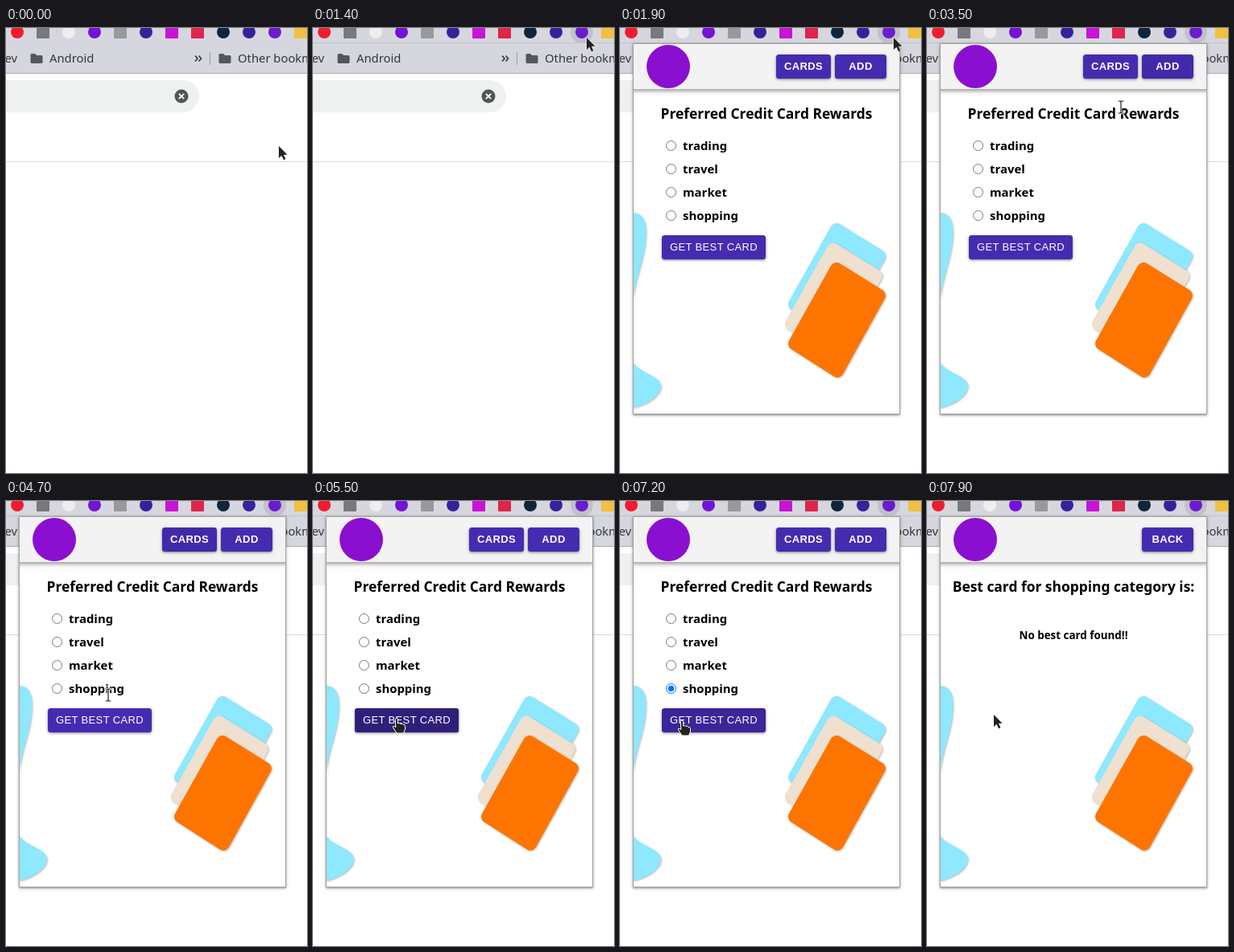
Recreate the animation shown at these times as an HTML page. Size 374x554 px, loop 8000 ms.

```html
<!DOCTYPE html>
<html lang="en">
<head>
<meta charset="utf-8">
<title>Card rewards popup</title>
<style>
  html, body { margin: 0; width: 100%; height: 100%; overflow: hidden; background: #fff; }
  svg { display: block; }
  .bar { font: 14.8px "Noto Sans", sans-serif; fill: #33363a; }
  .label { font: bold 14.9px "Noto Sans", sans-serif; }
  .title { font: bold 17.4px "Noto Sans", sans-serif; }
  .note { font: bold 13.4px "Noto Sans", sans-serif; }
  .button { font: bold 13px "Liberation Sans", sans-serif; letter-spacing: .37px; fill: #fff; text-anchor: middle; }
  .plain { font-weight: normal; }
  .raised { filter: drop-shadow(0 1px 1px #0005) drop-shadow(0 1px 2px #0003); }
  .header { filter: drop-shadow(0 2px 2px #0004) drop-shadow(0 2px 3px #0003); }
  .soft { filter: drop-shadow(1px 1px 1px #0004); }
</style>
</head>
<body>
<svg width="374" height="554" viewBox="0 0 374 554">
  <defs>
    <path id="folder" d="M0 1.5Q0 0 1.5 0H5.5L7.5 2H13.5Q15 2 15 3.5V10.5Q15 12 13.5 12H1.5Q0 12 0 10.5Z" fill="#54565a"/>
    <path id="card" d="M269 300L322 333L270 427L217 393Z" stroke-width="16" stroke-linejoin="round"/>
    <path id="caret" d="M-3 -7H-1L0 -6L1 -7H3M0 -6V7M-3 8H-1L0 7L1 8H3" fill="none"/>
    <clipPath id="frame"><rect x="17" y="20" width="330" height="460"/></clipPath>
  </defs>

  <rect width="374" height="56" fill="#d6d7de"/>
  <g id="active">
    <path d="M0 18.5H374" stroke="#c0c2c8"/>
    <circle cx="334" cy="5" r="14" fill="#c0c1c9"/>
  </g>
  <path d="M0 56.5H374" stroke="#a9abb0"/>
  <g id="icons"></g>
  <rect id="folderHover" x="257" y="24" width="130" height="28" rx="14" fill="#c6c7ce"/>
  <use href="#folder" x="30.5" y="32"/>
  <use href="#folder" x="264.5" y="32"/>
  <g class="bar">
    <text x="14" y="43" text-anchor="end">ev</text>
    <text x="54" y="43">Android</text>
    <text x="288" y="43">Other bookmarks</text>
  </g>
  <path d="M235 34.5L238 38L235 41.5M239.5 34.5L242.5 38L239.5 41.5" fill="none" stroke="#33363a" stroke-width="1.6"/>
  <path d="M253.5 30V46" stroke="#9b9da3"/>
  <rect x="-40" y="65" width="280" height="40" rx="20" fill="#eff1f1"/>
  <circle cx="218" cy="85" r="8.5" fill="#50555a"/>
  <path d="M214.8 81.8L221.2 88.2M221.2 81.8L214.8 88.2" stroke="#fff" stroke-width="1.8"/>
  <path d="M0 166.5H374" stroke="#d9dbdf"/>

  <g id="popup">
    <rect x="16.5" y="19.5" width="331" height="461" fill="#fff" stroke="#a8a8a8" class="raised"/>
    <g clip-path="url(#frame)">
      <rect x="7" y="10" width="350" height="66" fill="#f3f3f3" class="header"/>
      <g fill="#8ee8ff" class="soft">
        <path d="M16 230C28 230 34 240 32 262C30 290 19 310 16 342Z"/>
        <path d="M16 416C24 430 50 432 51 446C50 460 30 470 16 473Z"/>
      </g>
      <g id="cards"></g>
    </g>
    <circle cx="60" cy="48" r="27" fill="#8a0fd0"/>
    <g id="choose"><text class="title" x="50.5" y="112.5">Preferred Credit Card Rewards</text></g>
    <g id="result">
      <text class="title" x="182" y="112.5" text-anchor="middle">Best card for shopping category is:</text>
      <text class="note" x="182" y="172" text-anchor="middle">No best card found!!</text>
    </g>
  </g>

  <g id="cursor" stroke-linejoin="round" stroke-linecap="round">
    <path id="arrow" d="M0 0V15L3.5 11.8L6 17.3L8.4 16.2L6 10.8H10.6Z" fill="#222" stroke="#fff" paint-order="stroke"/>
    <g id="beam">
      <use href="#caret" stroke="#fff" stroke-width="3"/>
      <use href="#caret" stroke="#222" stroke-width="1.2"/>
    </g>
    <path id="hand" d="M-1.5 1Q0 -1 1.5 1V7Q4 5.5 5 7.5Q7.5 6.5 8 8.5Q10.5 8 10.5 10.5V14L8.5 19H0L-4.5 12Q-5 9.5 -2.5 10.5L-1.5 11.5Z" fill="#222" stroke="#fff"/>
  </g>
</svg>
<script>
const LOOP = 8000, STEP = 100;
const OPEN = 1600, PICK = 6800, SUBMIT = 7400;
const $ = id => document.getElementById(id);
const show = (el, on) => { el.style.display = on ? '' : 'none'; };
const clamp = v => Math.min(1, Math.max(0, v));

function add(parent, tag, attrs, text = '') {
  const el = document.createElementNS('http://www.w3.org/2000/svg', tag);
  for (const key in attrs) el.setAttribute(key, attrs[key]);
  el.textContent = text;
  return parent.appendChild(el);
}

function button(parent, x, y, width, label, style = '') {
  const box = { x, y, width, height: 30 };
  const group = add(parent, 'g', { class: 'raised' });
  add(group, 'rect', { ...box, rx: 3.5, fill: '#452bb0' });
  const shade = add(group, 'rect', { ...box, rx: 3.5, fill: '#301e7b' });
  add(parent, 'text', { x: x + width / 2, y: y + 19, class: 'button ' + style }, label);
  return { ...box, shade };
}

// Plain stand-ins for the toolbar icons, alternating round and square
['#ee1c2e', '#77797d', '#eeeeee', '#98999b', '#7412d6', '#c913d6'].forEach((fill, i) => {
  const order = [0, 1, 2, 4, 3, 6][i];
  add($('icons'), 'rect', { x: 6 + 32 * order, y: -3, width: 16, height: 16, rx: i % 2 ? 1 : 8, fill });
});
['#38209c', '#e0244c', '#10243c', '#38209c', '#6b1bd0', '#f0c040'].forEach((fill, i) => {
  const order = i ? i + 6 : 5;
  add($('icons'), 'rect', { x: 6 + 32 * order, y: -3, width: 16, height: 16, rx: i === 1 || i === 5 ? 1 : 8, fill });
});

['#8ee8ff', '#efe0cf', '#fd7500'].forEach((color, i) =>
  add($('cards'), 'use', { href: '#card', x: i === 1 ? -4 : 0, y: 24.5 * (i - 2), fill: color, stroke: color, class: 'soft' }));

['trading', 'travel', 'market', 'shopping'].forEach((name, i) => {
  const cy = 146.5 + 29 * i;
  add($('choose'), 'circle', { cx: 63.5, cy, r: 6, fill: '#fff', stroke: '#767676', id: name });
  add($('choose'), 'text', { x: 78, y: cy + 5.7, class: 'label' }, name);
});
const dot = add($('choose'), 'circle', { cx: 63.5, cy: 233.5, r: 3.7, fill: '#0075ff' });

const buttons = [
  button($('choose'), 194, 33, 68, 'CARDS'),
  button($('choose'), 267, 33, 64, 'ADD'),
  button($('choose'), 52, 258, 129, 'GET BEST CARD', 'plain')
];
show(button($('result'), 267, 33, 64, 'BACK').shade, false);

const texts = [
  { x: 50, y: 94, width: 264, height: 24 },
  { x: 78, y: 224, width: 70, height: 21 }
];

// Pointer moves: start time, end time, destination
const moves = [
  [500, 1400, 340, 12], [3100, 3500, 241, 98], [3800, 3900, 248, 78], [4100, 4300, 288, 46],
  [4400, 4500, 238, 48], [4500, 4700, 127, 241], [4900, 5200, 104, 270],
  [5800, 6100, 68, 235], [6800, 7200, 77, 273], [7800, 7900, 83, 266]
];

function pointer(t) {
  let x = 339, y = 147;
  for (const [start, end, toX, toY] of moves) {
    const k = clamp((t - start) / (end - start));
    x += (toX - x) * k;
    y += (toY - y) * k;
  }
  return { x: Math.round(x), y: Math.round(y) };
}

const inside = (p, box) =>
  p.x >= box.x && p.x <= box.x + box.width && p.y >= box.y && p.y <= box.y + box.height;

// Share of the last three steps spent over the box, eased
function hover(box, t) {
  const hits = [0, 1, 2].filter(i => inside(pointer(t - i * STEP), box)).length;
  return (hits / 3) ** 2;
}

function cursorShape(p, t) {
  if (t <= OPEN || t >= SUBMIT) return 'arrow';
  if (buttons.some(box => inside(p, box))) return 'hand';
  return texts.some(box => inside(p, box)) ? 'beam' : 'arrow';
}

function draw(now) {
  const t = Math.floor(now % LOOP / STEP) * STEP;
  const p = pointer(t), shape = cursorShape(p, t);
  $('cursor').setAttribute('transform', `translate(${p.x} ${p.y})`);
  ['arrow', 'beam', 'hand'].forEach(id => show($(id), id === shape));

  show($('active'), t >= 1300);
  show($('folderHover'), t < OPEN && p.y > 24 && p.y < 52);

  const open = clamp((t - OPEN) / 300);
  $('popup').setAttribute('opacity', open ** 2);
  $('popup').setAttribute('transform', `translate(0 ${6 * (open - 1)})`);
  show($('choose'), t < SUBMIT);
  show($('result'), t >= SUBMIT);

  show(dot, t >= PICK);
  $('shopping').setAttribute('stroke', t >= PICK ? '#0075ff' : '#767676');
  buttons.forEach(box => box.shade.setAttribute('opacity', hover(box, t)));
}

const start = performance.now();
(function tick() {
  draw(performance.now() - start);
  requestAnimationFrame(tick);
})();
</script>
</body>
</html>
```
